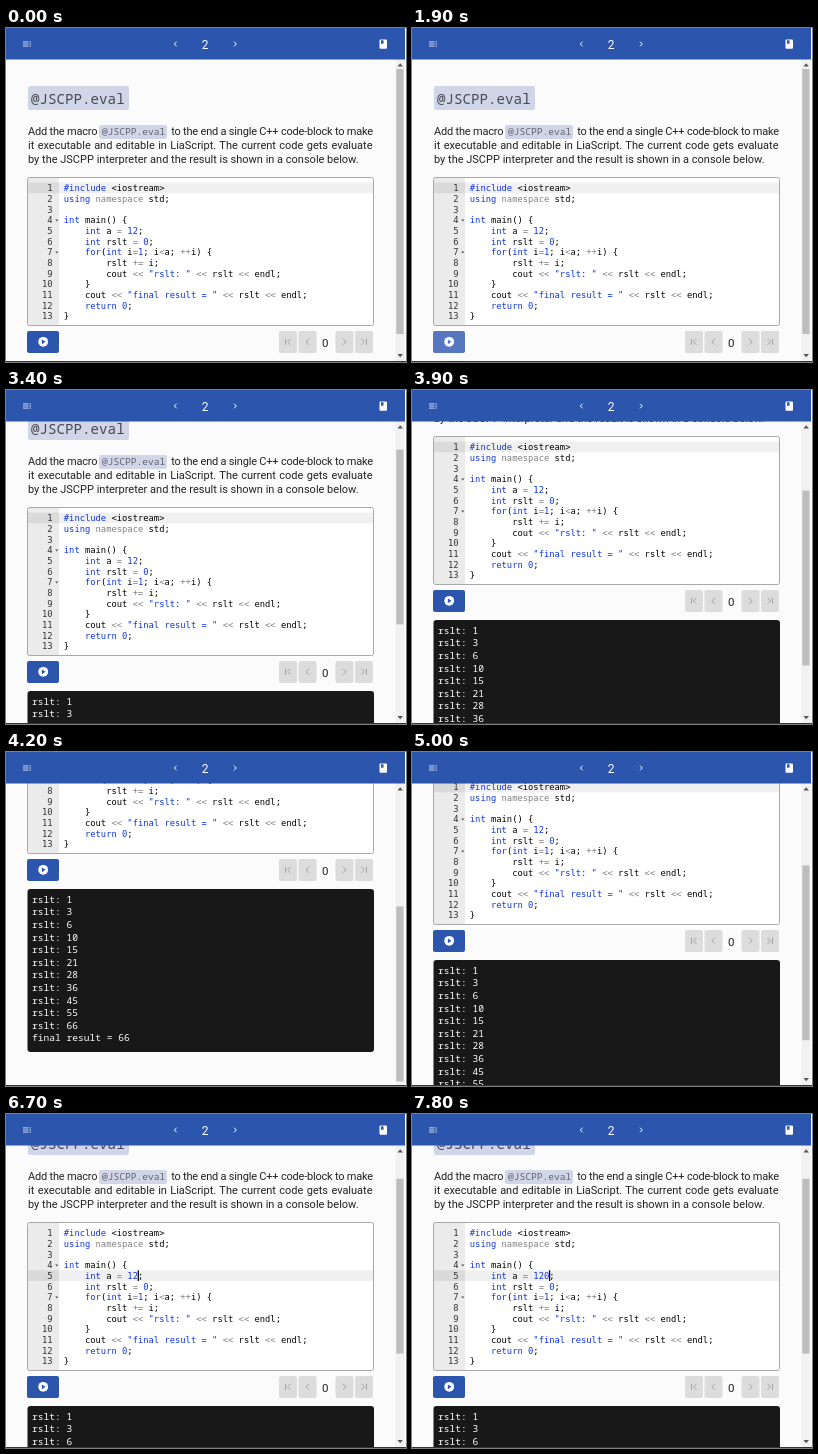
Write an HTML page that moves like this. It is 400 px wide and 334 px high and loops after 8000 ms.

```html
<!DOCTYPE html>
<html lang="en">
<head>
<meta charset="utf-8">
<title>C++ code block</title>
<style>
  html, body { margin: 0; width: 100%; height: 100%; overflow: hidden; background: #fbfbfb; }
  svg { display: block; width: 400px; height: 334px; }
  text { white-space: pre; font-family: Roboto, sans-serif; font-size: 11px; fill: #222; }
  .mono { font-family: "Noto Sans Mono", monospace; }
  .code { font-family: "DejaVu Sans Mono", monospace; font-size: 8.8px; fill: #000; }
  .num { fill: #333; text-anchor: end; }
  .key { fill: #0c34e6; }
  .op { fill: #808080; }
  .line { fill: none; stroke: #fff; stroke-width: 1; }
</style>
</head>
<body>
<svg viewBox="0 0 400 334">
  <rect width="400" height="334" fill="#fbfbfb"/>
  <g id="page">
    <rect x="22" y="58" width="101" height="24" rx="2" fill="#d0d5e7"/>
    <text class="mono" x="25" y="75.5" style="font-size:14.2px;fill:#484a52">@JSCPP.eval</text>
    <text x="22" y="107" letter-spacing="-.2">Add the macro</text>
    <rect x="93" y="97" width="68" height="14" rx="2" fill="#d0d5e7"/>
    <text class="mono" x="96" y="107" style="font-size:9.6px;fill:#62656e">@JSCPP.eval</text>
    <text x="367" y="107" letter-spacing="-.2" text-anchor="end">to the end a single C++ code-block to make</text>
    <text x="22" y="121" word-spacing=".65">it executable and editable in LiaScript. The current code gets evaluate</text>
    <text x="22" y="135">by the JSCPP interpreter and the result is shown in a console below.</text>

    <rect x="22" y="149.5" width="345.5" height="148" rx="2" fill="#fff"/>
    <rect x="22" y="149.5" width="31" height="148" fill="#ebebeb"/>
    <g id="active">
      <rect x="22" width="31" height="10.7" fill="#dadada"/>
      <rect x="53" width="314" height="10.7" fill="#f0f0f0"/>
    </g>
    <g id="code"></g>
    <rect id="caret" width="1.2" height="10.7" fill="#000"/>
    <rect x="21.5" y="149.5" width="346" height="148" rx="2" fill="none" stroke="#a8a8a8"/>

    <rect id="run" x="21" y="303" width="32" height="22" rx="2"/>
    <circle cx="37.2" cy="313.8" r="4.9" fill="#fff"/>
    <path id="play" d="M35.9 311.4v4.8l3.6-2.4z"/>
    <g id="history"></g>
    <text x="319.3" y="318.8" text-anchor="middle" style="font-size:11.5px">0</text>
    <g id="output"><rect x="21.5" y="333" width="346.5" height="163" rx="3" fill="#181818"/></g>
  </g>

  <rect x="389.5" y="31" width="9" height="303" fill="#f1f1f1"/>
  <path d="M391.5 38.5l2.7-3.2 2.7 3.2zM391.5 326l2.7 3.2 2.7-3.2z" fill="#555"/>
  <rect id="thumb" x="390.3" width="7.2" fill="#bdbdbd"/>

  <rect width="399" height="31.5" fill="#2c55ae"/>
  <rect x="399" width="1" height="334" fill="#fff"/>
  <path class="line" opacity=".75" d="M17 13.9h5.5M17 16h5.5M17 18.1h5.5M23.5 13.9h1.5M23.5 16h1.5M23.5 18.1h1.5"/>
  <path class="line" d="M170.6 13.7l-2.3 2.3 2.3 2.3M228 13.7l2.3 2.3-2.3 2.3"/>
  <text x="199" y="20.8" text-anchor="middle" style="font-size:12px;fill:#fff">2</text>
  <rect x="373.5" y="11.5" width="7.5" height="9.3" rx="1" fill="#fff"/>
  <path d="M375 12.3h2.5v4l-1.25-1-1.25 1z" fill="#2c55ae"/>
  <rect y="333" width="400" height="1" fill="#333"/>
</svg>
<script>
const LOOP = 8000, STEP = 100, PITCH = 10.67, TOP = 154.6, CHAR = 5.3, CODE_X = 57.8;
const TRACK_TOP = 41, TRACK = 286, VIEW = 302;
const byId = id => document.getElementById(id);
const [page, active, code, caret, run, play, pager, output, thumb] =
  ['page', 'active', 'code', 'caret', 'run', 'play', 'history', 'output', 'thumb'].map(byId);

const add = (parent, tag, attrs, content = '') => {
  const node = document.createElementNS('http://www.w3.org/2000/svg', tag);
  for (const key in attrs) node.setAttribute(key, attrs[key]);
  node.textContent = content;
  return parent.appendChild(node);
};

const source = `#include <iostream>
using namespace std;

int main() {
    int a = 12;
    int rslt = 0;
    for(int i=1; i<a; ++i) {
        rslt += i;
        cout << "rslt: " << rslt << endl;
    }
    cout << "final result = " << rslt << endl;
    return 0;
}`.split('\n');

const TOKEN = /<iostream>|"[^"]*"|#include|\b(?:using|int|for|return|namespace)\b|\b\d+\b|[<+=]+|[^<+="#\w]+|\w+/g;
function tokenClass(token) {
  if (/^(["#\d]|(using|int|for|return)$)/.test(token)) return 'key';
  return /^(namespace|[<+=]+)$/.test(token) ? 'op' : '';
}
function paintLine(node, line) {
  node.textContent = '';
  for (const token of line.match(TOKEN) || [])
    add(node, 'tspan', { class: tokenClass(token) }, token);
}

const lines = source.map((line, i) => {
  const y = TOP + i * PITCH + 8.6;
  add(code, 'text', { class: 'code num', x: 46.5, y }, i + 1);
  if (/\{$/.test(line)) add(code, 'path', { d: `M49.2 ${y - 3.8}h3.2l-1.6 2z`, fill: '#555' });
  const node = add(code, 'text', { class: 'code', x: CODE_X, y });
  paintLine(node, line);
  return node;
});

const icons = ['M-2.5-3v6M2.5-3l-3 3 3 3', 'M1.5-3l-3 3 3 3', 'M-1.5-3l3 3-3 3', 'M2.5-3v6M-2.5-3l3 3-3 3'];
[273, 292.5, 329.5, 349].forEach((x, i) => {
  add(pager, 'rect', { x, y: 303, width: 18, height: 22, rx: 2, fill: '#dcdcdc' });
  add(pager, 'path', { d: icons[i], transform: `translate(${x + 9} 313.8)`,
    fill: 'none', stroke: '#a2a2a2', 'stroke-width': 1 });
});

for (let i = 1, sum = 0; i <= 12; i++) {
  if (i < 12) sum += i;
  add(output, 'text', { class: 'mono', x: 26, y: 346.8 + (i - 1) * 12.6, style: 'font-size:9.6px;fill:#fff' },
    (i < 12 ? 'rslt: ' : 'final result = ') + sum);
}

// Wheel turns: start time and the scroll position of each following step.
const turns = [
  [3300, [9, 32, 63, 77]],
  [3800, [84, 103, 148, 184, 196]],
  [4800, [190, 160, 125, 94, 68, 49, 41]]
];
function scrollAt(time) {
  let y = 0;
  for (const [start, stops] of turns)
    if (time >= start) y = stops[Math.min(stops.length - 1, (time - start) / STEP)];
  return y;
}
const ramp = (time, start, length) => Math.max(0, Math.min(1, (time - start) / length));

let typed = null;
function draw(ms) {
  const time = Math.floor(ms / STEP) * STEP;
  const scroll = scrollAt(time);
  const shown = ramp(time, 1900, 300);
  const height = shown > 0 ? 494 : 326;
  page.setAttribute('transform', `translate(0 ${-scroll})`);
  thumb.setAttribute('y', TRACK_TOP + scroll * TRACK / height);
  thumb.setAttribute('height', VIEW * TRACK / height);
  output.setAttribute('opacity', shown);

  const hover = ramp(time, 800, 300) - ramp(time, 2300, 300);
  const blue = `rgb(${44 + 42 * hover},${85 + 34 * hover},${174 + 18 * hover})`;
  run.setAttribute('fill', blue);
  play.setAttribute('fill', blue);

  const text = time >= 7700 ? '120' : '12';
  if (text !== typed) paintLine(lines[4], source[4].replace('12', typed = text));
  const row = time >= 6700 ? 4 : 0;
  active.setAttribute('transform', `translate(0 ${TOP + row * PITCH})`);
  caret.setAttribute('x', CODE_X + (12 + text.length) * CHAR - .3);
  caret.setAttribute('y', TOP + 4 * PITCH);
  caret.setAttribute('opacity', row && (time < 7300 || time >= 7700) ? 1 : 0);
}

function tick(now) {
  draw(now % LOOP);
  requestAnimationFrame(tick);
}
draw(0);
requestAnimationFrame(tick);
</script>
</body>
</html>
```
